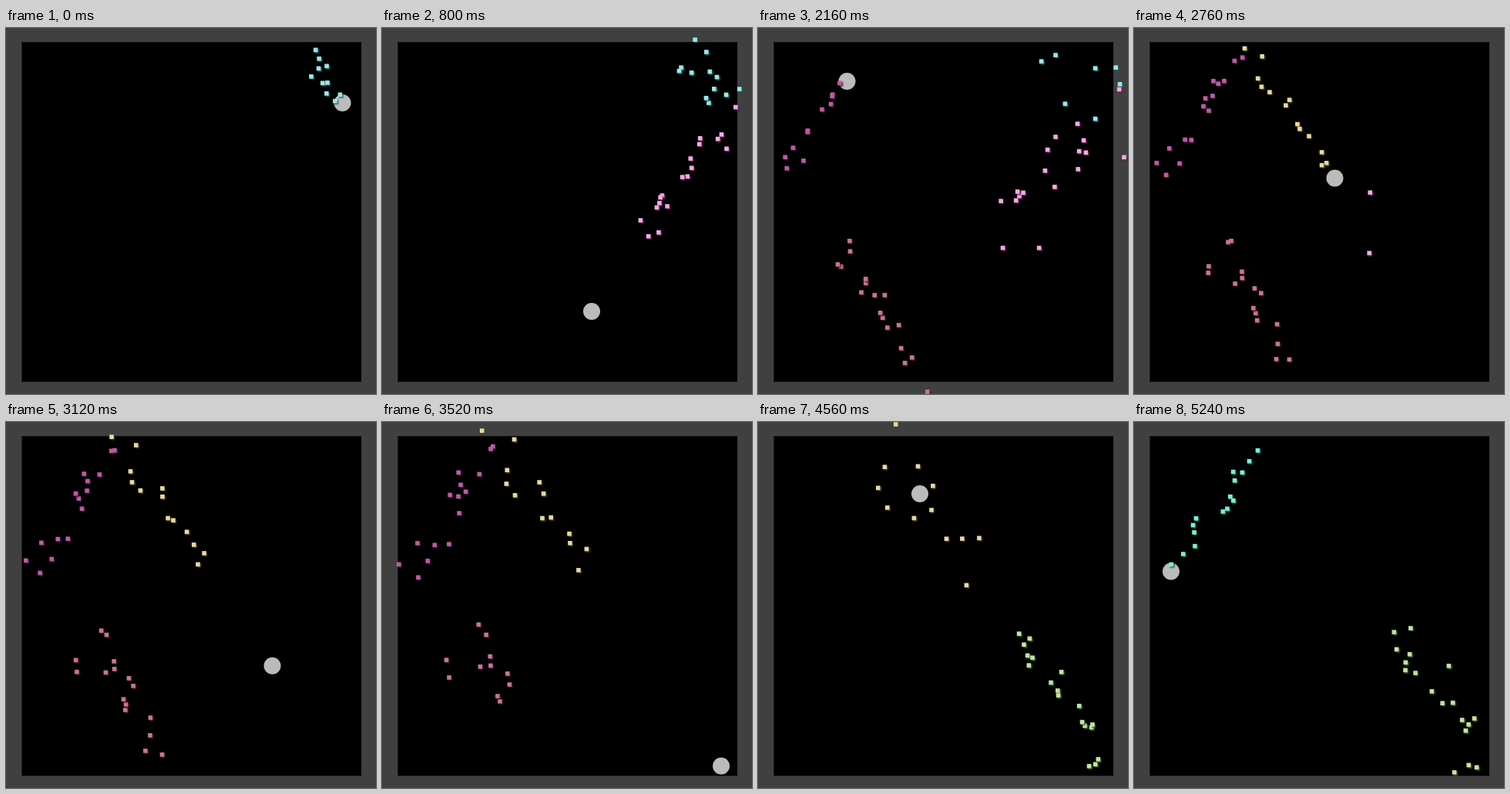
These frames come from a looping animation (480x474 px, 5280 ms). An HTML page with a canvas:

```html
<!DOCTYPE html>
<html lang="en">
<head>
<meta charset="utf-8">
<title>Bouncing ball</title>
<style>
html, body { margin: 0; width: 100%; height: 100%; overflow: hidden; background: #404040; }
canvas { display: block; }
</style>
</head>
<body>
<canvas id="stage" width="480" height="474"></canvas>
<script>
const ctx = document.getElementById('stage').getContext('2d');
const LOOP = 5280, STEP = 40, LIFE = 2290, SIZE = 5.6;
const LEFT = 31.5, TOP = 29.5, SPAN_X = 418, SPAN_Y = 418.5;

// Time and distance travelled on each axis, with the wall bounces unfolded.
const path = [
  [0, 405, 67.5], [800, 595.5, 337.5], [1560, 775, 593], [2760, 1065, 1002],
  [3520, 1244.5, 1258], [4560, 1493.5, 1610.5], [5240, 1655.5, 1838]
];

// Each wall hit leaves a trail of sparks.
const bursts = [
  { start: -190, length: 210, count: 12, color: '#aedfe0', glow: '#00707c' },
  { start: 55, length: 470, count: 18, color: '#e4b4d8', glow: '#7c1068' },
  { start: 1040, length: 500, count: 17, color: '#bb7c92', glow: '#5c0c38' },
  { start: 1816, length: 450, count: 15, color: '#b0639c', glow: '#5c0c4c' },
  { start: 2280, length: 460, count: 13, color: '#e4d8aa', glow: '#4c3c14' },
  { start: 3510, length: 550, count: 18, color: '#c6deb0', glow: '#346814' },
  { start: 4750, length: 470, count: 15, color: '#8ee4d4', glow: '#006c4c' }
];

function randomizer(seed) {
  return () => {
    seed = (seed + 0x6D2B79F5) | 0;
    let n = Math.imul(seed ^ (seed >>> 15), 1 | seed);
    n = (n + Math.imul(n ^ (n >>> 7), 61 | n)) ^ n;
    return ((n ^ (n >>> 14)) >>> 0) / 4294967296;
  };
}

function fold(d, span) {
  const m = ((d % (2 * span)) + 2 * span) % (2 * span);
  return m > span ? 2 * span - m : m;
}

function ballAt(t) {
  let i = 0;
  while (i < path.length - 2 && t >= path[i + 1][0]) i++;
  const [t0, x0, y0] = path[i], [t1, x1, y1] = path[i + 1];
  const k = (t - t0) / (t1 - t0);
  return {
    x: LEFT + fold(x0 + (x1 - x0) * k, SPAN_X),
    y: TOP + fold(y0 + (y1 - y0) * k, SPAN_Y)
  };
}

const random = randomizer(5);
const spread = r => (random() * 2 - 1) * r;

const sparks = bursts.flatMap(b => Array.from({ length: b.count }, (_, i) => {
  const born = b.start + (i + random()) / b.count * b.length;
  const from = ballAt(born);
  return {
    born, color: b.color, glow: b.glow,
    x: from.x + spread(12), y: from.y + spread(10),
    vx: spread(0.9) / STEP, vy: spread(0.8) / STEP
  };
}));

function drawSpark(s, t) {
  const age = t - s.born;
  if (age < STEP / 2 || age > LIFE) return;
  ctx.fillStyle = s.color;
  ctx.shadowColor = s.glow;
  ctx.fillRect(s.x + s.vx * age - SIZE / 2, s.y + s.vy * age - SIZE / 2, SIZE, SIZE);
}

function draw(t) {
  ctx.fillStyle = '#404040';
  ctx.fillRect(0, 0, 480, 474);
  ctx.fillStyle = '#000';
  ctx.fillRect(20.5, 18.3, 440.5, 439.9);

  const ball = ballAt(t);
  ctx.fillStyle = '#bbb';
  ctx.beginPath();
  ctx.arc(ball.x, ball.y, 11, 0, Math.PI * 2);
  ctx.fill();

  ctx.save();
  ctx.shadowOffsetX = ctx.shadowOffsetY = 1.5;
  ctx.shadowBlur = 2;
  sparks.forEach(s => drawSpark(s, t));
  ctx.restore();
}

let began = null;
function tick(now) {
  if (began === null) began = now;
  const t = Math.max(0, now - began) % LOOP;
  draw(Math.floor(t / STEP) * STEP);
  requestAnimationFrame(tick);
}
draw(0);
requestAnimationFrame(tick);
</script>
</body>
</html>
```
